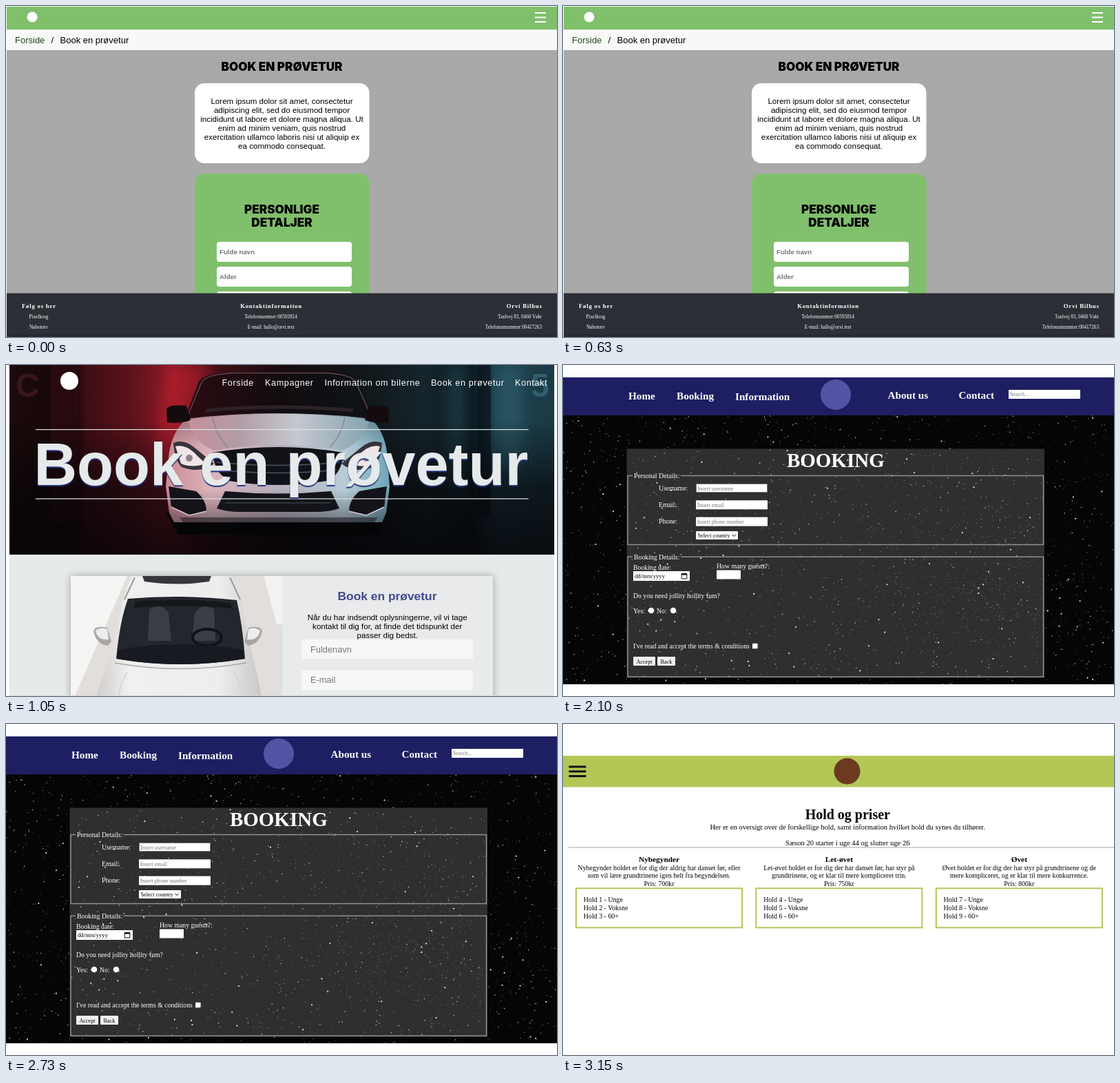
Animation of 800 by 480 pixels, one loop 4200 ms. Source, as an HTML page:

```html
<!DOCTYPE html>
<html lang="da">
<head>
<meta charset="utf-8">
<title>Bookingsider</title>
<style>
  html, body { margin: 0; width: 100%; height: 100%; overflow: hidden; background: #fff; }
  svg { display: block; width: 800px; height: 480px; }
  .sans { font-family: "Liberation Sans", Arial, sans-serif; }
  .serif { font-family: "Liberation Serif", "Times New Roman", serif; }
  .round { font-family: Inter, sans-serif; font-weight: 900; }
  .b { font-weight: 700; }
  .mid { text-anchor: middle; }
  .end { text-anchor: end; }
  .nav { letter-spacing: .62px; }
  .wide { letter-spacing: .75px; }
  .hero { text-shadow: 0 2px 1px #26357f; }
  .soft { filter: blur(.6px); }
  .glow { filter: blur(9px); }
  .shadow { filter: drop-shadow(0 0 6px rgba(0, 0, 0, .3)); }
</style>
</head>
<body>
<svg id="stage" viewBox="0 0 800 480" xmlns="http://www.w3.org/2000/svg"></svg>
<script>
const SCENE_MS = 1050;

const rect = (x, y, w, h, fill, r = 0, extra = '') =>
  `<rect x="${x}" y="${y}" width="${w}" height="${h}" rx="${r}" fill="${fill}" ${extra}/>`;
const dot = (x, y, r, fill) => `<circle cx="${x}" cy="${y}" r="${r}" fill="${fill}"/>`;
const shape = (d, fill, extra = '') => `<path d="${d}" fill="${fill}" ${extra}/>`;
const stroke = (d, color, w, extra = '') =>
  `<path d="${d}" fill="none" stroke="${color}" stroke-width="${w}" ${extra}/>`;
const text = (x, y, str, size, cls, fill = '#000') =>
  `<text x="${x}" y="${y}" font-size="${size}" class="${cls}" fill="${fill}">${str.replace(/&/g, '&amp;')}</text>`;
const lines = (x, y, step, list, size, cls, fill) =>
  list.map((s, i) => text(x, y + i * step, s, size, cls, fill)).join('');
const mirror = (axis, body) => body + `<g transform="translate(${2 * axis} 0) scale(-1 1)">${body}</g>`;
const gradient = (id, stops, end = 'x2="1" y2="0"') =>
  `<linearGradient id="${id}" x1="0" y1="0" ${end}>` +
  stops.map(([at, c]) => `<stop offset="${at}" stop-color="${c}"/>`).join('') + '</linearGradient>';
const down = 'x2="0" y2="1"';

const defs = '<defs>' +
  gradient('room', [[0, '#1c0a0c'], [.12, '#160708'], [.14, '#3d0d13'], [.22, '#5c121b'], [.3, '#8c1a27'], [.36, '#4a1119'],
    [.5, '#170b0e'], [.65, '#11171a'], [.76, '#15252b'], [.85, '#0d1a20'], [.89, '#1d414d'], [1, '#1b3a45']]) +
  gradient('floor', [[0, 'rgba(6,5,8,0)'], [.5, 'rgba(6,5,8,.65)'], [1, 'rgba(6,5,8,.86)']], down) +
  gradient('paint', [[0, '#c98a94'], [.2, '#dcb4bb'], [.5, '#b5afba'], [.8, '#b7ccd6'], [1, '#6da5b6']]) +
  gradient('hood', [[0, '#c58f99'], [.28, '#b29ca6'], [.6, '#c4c8cf'], [1, '#84a3b0']]) +
  gradient('shade', [[0, 'rgba(20,16,24,.35)'], [.3, 'rgba(20,16,24,0)'], [.7, 'rgba(20,16,24,0)'], [1, 'rgba(20,16,24,.45)']], down) +
  gradient('glass', [[0, '#2a0b10'], [.5, '#120c10'], [1, '#0d1317']]) +
  gradient('topcar', [[0, '#cfcdcb'], [.2, '#f1f0f0'], [.75, '#eeeded'], [1, '#c9c7c6']]) +
  '<clipPath id="heroClip"><rect x="5" y="0" width="791" height="275"/></clipPath>' +
  '<clipPath id="cardClip"><rect x="94" y="306" width="307" height="174"/></clipPath>' +
  '<clipPath id="skyClip"><rect x="0" y="73" width="800" height="390"/></clipPath>' +
  '</defs>';

function dealerMobile() {
  const burger = [10, 16.5, 23].map(y => rect(768, y - 1, 16, 2, '#fff')).join('');
  const field = (y, label) => rect(306, y, 196, 29, '#fff', 4) +
    text(310, y + 17.5, label, 9.7, 'sans b', '#757575');
  const head = (x, s, cls) => text(x, 437.5, s, 8.8, 'serif b wide ' + cls, '#fff');
  const small = (x, list, cls) => lines(x, 453, 15.3, list, 7.2, 'serif ' + cls, '#fff');
  return rect(1, 1, 799, 33.5, '#80c06c') + dot(38, 16, 7.5, '#fff') + burger +
    rect(1, 34.5, 799, 30, '#f8f8f8') + rect(1, 64, 799, 353, '#a9a9a9') +
    text(13, 54, 'Forside', 13, 'sans', '#234d16') + text(65.5, 54, '/', 13, 'sans') +
    text(78.5, 54, 'Book en prøvetur', 13, 'sans') +
    text(400.5, 93.5, 'BOOK EN PRØVETUR', 17.1, 'round mid') +
    rect(274, 112, 253.5, 116, '#fff', 14) +
    lines(400.5, 141.5, 13.05, [
      'Lorem ipsum dolor sit amet, consectetur', 'adipiscing elit, sed do eiusmod tempor',
      'incididunt ut labore et dolore magna aliqua. Ut', 'enim ad minim veniam, quis nostrud',
      'exercitation ullamco laboris nisi ut aliquip ex', 'ea commodo consequat.'], 11.6, 'sans mid') +
    rect(274, 243, 253.5, 220, '#80c06c', 14) +
    lines(400.5, 301, 19, ['PERSONLIGE', 'DETALJER'], 17.1, 'round mid') +
    field(342, 'Fulde navn') + field(378, 'Alder') + field(414, '') +
    rect(1, 416.5, 799, 60, '#2d2f36') + rect(1, 476, 799, 4, '#2b2731') +
    head(23, 'Følg os her', '') + head(385, 'Kontaktinformation', 'mid') + head(778.7, 'Orvi Bilhus', 'end') +
    small(47.5, ['Pixelkrog', 'Nabotorv'], 'mid') +
    small(384.7, ['Telefonnummer:00593814', 'E-mail: hallo@orvi.test'], 'mid') +
    small(778, ['Tuslvej 83, 0460 Vøle', 'Telefonumummer:00417263'], 'end');
}

function garage() {
  return rect(5, 0, 791, 275, 'url(#room)') +
    '<g class="glow">' +
    shape('M232 0H300L262 80L240 150H215Z', '#c0202f', 'opacity=".55"') +
    shape('M640 0H668V190H640Z', '#25505d', 'opacity=".45"') +
    shape('M712 0H752V150H712Z', '#3d7587', 'opacity=".35"') + '</g>' +
    rect(65, 0, 39, 230, '#3a0f14', 0, 'opacity=".5"') + rect(684, 0, 20, 220, '#08141a', 0, 'opacity=".7"') +
    text(14, 46, 'C', 48, 'sans b', '#38161a') + text(762, 46, '5', 48, 'sans b', '#315e6c') +
    rect(5, 80, 791, 195, 'url(#floor)');
}

function frontCar() {
  const side = shape('M233 64Q236 57 262 59L268 80Q250 86 234 83Z', '#140b0f') +
    shape('M236 176L276 183Q291 196 291 212L266 218L240 206Z', '#15131a') +
    stroke('M240 206L266 218L291 212', '#d9c9d0', 1.5) +
    shape('M243 113Q258 107 274 120L302 143Q284 158 255 148Q245 138 243 113Z', '#37333c') +
    shape('M246 118Q262 114 278 132L290 143Q270 150 254 143Z', '#f1e3e7') +
    dot(266, 135, 5, '#8b838c');
  const body = 'M262 78Q395 62 530 78Q549 96 553 126L557 176L552 214L546 228H244L237 214L232 176L237 126Q242 96 262 78Z';
  return '<g class="soft">' +
    shape('M232 214H556L540 246H250Z', '#050507') +
    shape('M258 82L280 24Q286 12 335 10H462Q504 12 511 24L536 82Z', 'url(#glass)') +
    stroke('M262 78L284 25Q290 13 335 11.5H462Q501 13 508 25L532 78', '#64444d', 1.5) +
    stroke('M290 66Q395 56 504 66', '#2c2228', 5) +
    shape(body, 'url(#paint)') + shape(body, 'url(#shade)') +
    shape('M264 79Q395 62 528 79Q518 112 488 124Q395 108 302 124Q272 112 264 79Z', 'url(#hood)') +
    stroke('M300 76Q306 104 322 119M492 76Q486 104 470 119', '#8f8690', 1.5) +
    shape('M300 127Q395 111 490 127Q488 158 466 168Q395 180 324 168Q302 156 300 127Z', '#111218') +
    stroke('M306 141Q395 150 484 141M310 152Q395 161 480 152', '#4d525b', 1.5) +
    shape('M318 183Q395 190 472 183L484 208Q470 213 450 213H340Q320 213 306 208Z', '#14151b') +
    stroke('M318 200H472', '#393d45', 1.5) +
    shape('M252 221H540L534 229H258Z', '#1c1a20', 'opacity=".55"') +
    mirror(394.5, side) + '</g>';
}

function topCar() {
  const seat = shape('M208 354Q226 344 236 360L240 400H206Z', '#3b3e46');
  return `<g clip-path="url(#cardClip)">` + rect(94, 306, 307, 174, '#e1dedb') +
    shape('M94 306H176L100 480H94Z', '#f5f5f4') + shape('M374 306H401V376L393 376Z', '#f3f2f1') +
    '<g class="soft">' +
    shape('M183 306H329Q342 334 350 390L364 446L371 480H131L145 440L162 382Q170 330 183 306Z', 'url(#topcar)') +
    shape('M198 306H298L295 314Q250 321 201 314Z', '#37373b') +
    stroke('M187 308L172 340M325 308L340 340', '#9d9a99', 2) +
    shape('M177 339Q255 332 335 341Q344 380 347 426Q252 442 160 426Q165 372 177 339Z', '#23262d') +
    shape('M188 343Q255 337 325 345L328 353Q255 346 185 352Z', '#15171b') +
    mirror(255, seat) +
    `<ellipse cx="292" cy="395" rx="21" ry="12" fill="none" stroke="#101216" stroke-width="4"/>` +
    shape('M163 413Q253 397 344 413L346 426Q252 442 161 426Z', '#171a20') +
    mirror(249.5, shape('M127 386Q130 377 147 381L153 401L148 407Q131 405 127 386Z', '#a9a7a6') +
      shape('M130 385Q138 379 147 383L149 398Q133 400 130 385Z', '#eeeded')) +
    stroke('M158 432Q252 449 349 432', '#a9a7a6', 1.5) +
    stroke('M176 446Q166 460 164 480M330 446Q341 460 343 480', '#d3d1d0', 1.5) + '</g></g>';
}

function dealerDesktop() {
  const nav = [[313.5, 'Forside'], [376, 'Kampagner'], [462.5, 'Information om bilerne'],
    [617, 'Book en prøvetur'], [739, 'Kontakt']];
  const field = (y, label) => rect(429.5, y, 248.5, 28.5, '#f6f7f7') +
    text(442, y + 18.5, label, 12.8, 'sans', '#757575');
  return rect(5, 275, 791, 205, '#e6eaea') +
    `<g clip-path="url(#heroClip)">${garage()}${frontCar()}</g>` + dot(92, 23, 13, '#fff') +
    nav.map(([x, s]) => text(x, 30, s, 12.6, 'sans nav', '#fff')).join('') +
    rect(43, 93, 715.5, 1.2, '#dfe3e4') + rect(43, 193.4, 715.5, 1.2, '#dfe3e4') +
    text(40.5, 174, 'Book en prøvetur', 86.7, 'sans b hero', '#e6eaea') +
    rect(94, 306, 613, 190, '#e8eaeb', 0, 'class="shadow"') + topCar() +
    text(553.5, 340.5, 'Book en prøvetur', 17.4, 'sans b mid', '#414a8d') +
    lines(553.7, 369.5, 13.1, ['Når du har indsendt oplysningerne, vil vi tage',
      'kontakt til dig for, at finde det tidspunkt der', 'passer dig bedst.'], 11.6, 'sans mid') +
    field(398, 'Fuldenavn') + field(442.7, 'E-mail') + rect(5, 479, 791, 1, '#d5d9d9');
}

function stars() {
  let seed = 71;
  const rnd = () => (seed = seed * 16807 % 2147483647) / 2147483647;
  const bell = () => rnd() + rnd() + rnd() - 1.5;
  const layer = (n, color, w, place) => {
    let d = '';
    for (let i = 0; i < n; i++) {
      const [x, y] = place();
      d += `M${x.toFixed(1)} ${y.toFixed(1)}h.01`;
    }
    return stroke(d, color, w, 'stroke-linecap="round"');
  };
  const any = () => [rnd() * 800, 73 + rnd() * 390];
  const cloud = () => [590 + bell() * 150, 330 + bell() * 150];
  return `<g clip-path="url(#skyClip)">` + layer(1300, '#5c5d63', .9, any) + layer(600, '#94959b', 1.2, any) +
    layer(300, '#c6c7cc', 1.5, any) + layer(80, '#f0f0f2', 2.1, any) + layer(350, '#666a80', 1, cloud) + '</g>';
}

function spaceBooking() {
  const nav = [[95, 50, 'Home'], [165, 50, 'Booking'], [250, 50.5, 'Information'], [471.5, 49.2, 'About us'], [574.5, 49.2, 'Contact']];
  const label = (x, y, s) => text(x, y, s, 9.75, 'serif', '#fff');
  const field = (x, y, w, hint = '') => rect(x, y, w, 13, '#fff') + text(x + 2, y + 9.6, hint, 8.2, 'serif', '#777');
  const fieldset = (y, h, gap, legend) =>
    stroke(`M101 ${y}H94V${y + h}H697.5V${y}H${gap}`, '#8f8f8f', 1.5) + label(103, y + 3.5, legend);
  const button = (x, w, s) => rect(x, 423, w, 13, '#efefef', 1) + text(x + w / 2, 432.6, s, 8.2, 'serif mid');
  return rect(0, 73, 800, 390, '#050506') + stars() + rect(0, 18, 800, 55, '#1e1f62') +
    nav.map(([x, y, s]) => text(x, y, s, 15.2, 'serif b', '#fff')).join('') +
    dot(396, 43, 22, '#5353a5') +
    rect(647, 36, 104, 13, '#fff') + text(649, 45.4, 'Search...', 7.8, 'serif', '#777') +
    rect(92.5, 121.5, 606.5, 332, '#fff', 0, 'opacity=".17"') +
    text(395.8, 148, 'BOOKING', 29, 'serif b mid', '#fff') +
    fieldset(160.5, 100, 170.5, 'Personal Details:') + fieldset(278.3, 174, 171, 'Booking Details:') +
    lines(139, 182, 24.2, ['Username:', 'Email:', 'Phone:'], 9.75, 'serif', '#fff') +
    ['Insert username', 'Insert email', 'Insert phone number'].map((s, i) => field(193, 172 + i * 24.3, 104, s)).join('') +
    rect(193.5, 172.5, 103, 12, 'none', 0, 'stroke="#777" stroke-width="1"') +
    rect(193, 241, 61, 12, '#fff', 1) + text(195.5, 250, 'Select country', 8.2, 'serif') +
    stroke('M245.5 245.8l2.7 2.7l2.7 -2.7', '#000', 1) +
    label(102, 296.5, 'Booking date:') + rect(102, 299, 82, 14, '#fff') + text(104, 309, 'dd/mm/yyyy', 8.6, 'serif') +
    stroke('M172.2 303H179.8V310H172.2Z', '#111', 1) + rect(172, 302, 8, 2.5, '#111') +
    label(223, 295, 'How many guests?:') + field(223, 297.5, 35) +
    label(102, 338, 'Do you need jollity hollity fum?') +
    label(102, 359.5, 'Yes:') + dot(128, 356, 4.3, '#fff') + label(136, 359.5, 'No:') + dot(160, 356, 4.3, '#fff') +
    label(102, 411, "I've read and accept the terms & conditions") + rect(275, 403.8, 7.6, 7.4, '#fff', 1) +
    button(102, 32, 'Accept') + button(137, 26, 'Back');
}

function danceClasses() {
  const green = '#b3c757';
  const column = (i, name, about, price) => {
    const left = 18 + i * 261.4, mid = left + 121.5;
    const teams = ['Unge', 'Voksne', '60+'].map((s, k) => `Hold ${i * 3 + k + 1} - ${s}`);
    return text(mid, 199.8, name, 11.3, 'serif b mid') +
      lines(mid, 211.7, 11.5, [...about, `Pris: ${price}kr`], 9.95, 'serif mid') +
      rect(left + 1, 238.3, 241, 57, 'none', 0, `stroke="${green}" stroke-width="2"`) +
      lines(left + 11.8, 258.3, 12, teams, 9.95, 'serif');
  };
  return rect(0, 46, 800, 45.5, green) +
    [62, 68.8, 75.6].map(y => rect(8.5, y - 1.5, 25, 3, '#111')).join('') + dot(412.5, 68.5, 19, '#6b3a20') +
    text(413.3, 138, 'Hold og priser', 20, 'serif b mid') +
    text(413.3, 152.5, 'Her er en oversigt over de forskellige hold, samt information hvilket hold du synes du tilhører.', 10.6, 'serif mid') +
    text(413.3, 176.3, 'Sæson 20 starter i uge 44 og slutter uge 26', 10.6, 'serif mid') +
    rect(8, 178.5, 792, 1, '#a5a5a5') +
    column(0, 'Nybegynder', ['Nybegynder holdet er for dig der aldrig har danset før, eller',
      'som vil lære grundtrinene igen helt fra begyndelsen.'], 700) +
    column(1, 'Let-øvet', ['Let-øvet holdet er for dig der har danset før, har styr på',
      'grundtrinene, og er klar til mere kompliceret trin.'], 750) +
    column(2, 'Øvet', ['Øvet holdet er for dig der har styr på grundtrinene og de',
      'mere kompliceret, og er klar til mere konkurrence.'], 800);
}

const stage = document.getElementById('stage');
const scenes = [dealerMobile, dealerDesktop, spaceBooking, danceClasses];
stage.innerHTML = defs + scenes.map(draw => `<g class="scene">${draw()}</g>`).join('');
const groups = [...stage.querySelectorAll('.scene')];

function show(t) {
  const now = Math.floor(t / SCENE_MS) % groups.length;
  groups.forEach((g, i) => { g.style.display = i === now ? '' : 'none'; });
}

const start = performance.now();
function tick() {
  show(performance.now() - start);
  requestAnimationFrame(tick);
}
tick();
</script>
</body>
</html>
```
